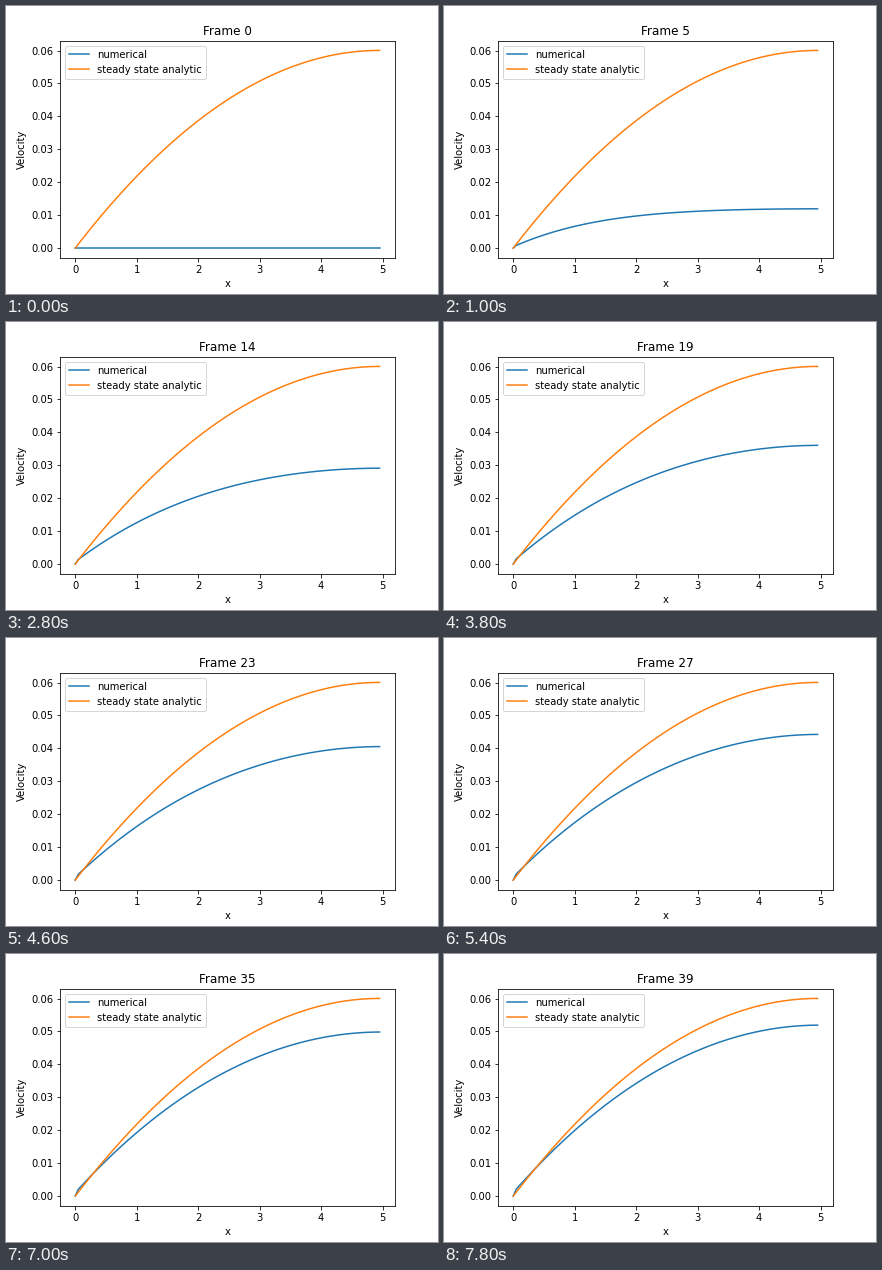
These frames come from a looping animation (432 by 288 pixels, 8000 ms). A matplotlib script:

```python
import numpy as np
import matplotlib.pyplot as plt
from matplotlib.animation import FuncAnimation

STEPS = 40
N = 100
DX = 0.05
DIFF = 0.5            # viscosity times time step
FORCE = 0.0049        # driving acceleration over viscosity

x = np.arange(N) * DX
beta = DIFF / DX**2

# Implicit diffusion matrix: fixed wall on the left, no stress on the right
A = (np.diag(np.full(N, 1 + 2 * beta))
     - np.diag(np.full(N - 1, beta), 1)
     - np.diag(np.full(N - 1, beta), -1))
A[-1, -1] = 1 + beta
inverse = np.linalg.inv(A)


def solve_flow():
    u = np.zeros(N)
    history = [u]
    for _ in range(STEPS - 1):
        u = inverse @ (u + FORCE * DIFF)
        u[0] = 0
        history.append(u)
    return history


velocity = solve_flow()
steady = FORCE * (x[-1] * x - x**2 / 2)

plt.rcParams["font.family"] = "DejaVu Sans"
fig, ax = plt.subplots(figsize=(6, 4), dpi=72)
fig.subplots_adjust(left=0.125, right=0.9, bottom=0.125, top=0.88)

line, = ax.plot(x, velocity[0], label="numerical")
ax.plot(x, steady, label="steady state analytic")
ax.set_xlabel("x")
ax.set_ylabel("Velocity")
ax.legend(loc="upper left")
title = ax.set_title("Frame 0")


def update(i):
    line.set_ydata(velocity[i])
    title.set_text(f"Frame {i}")
    return line, title


anim = FuncAnimation(fig, update, frames=STEPS, interval=200,
                     repeat=True, repeat_delay=0, blit=False)
plt.show()
```
